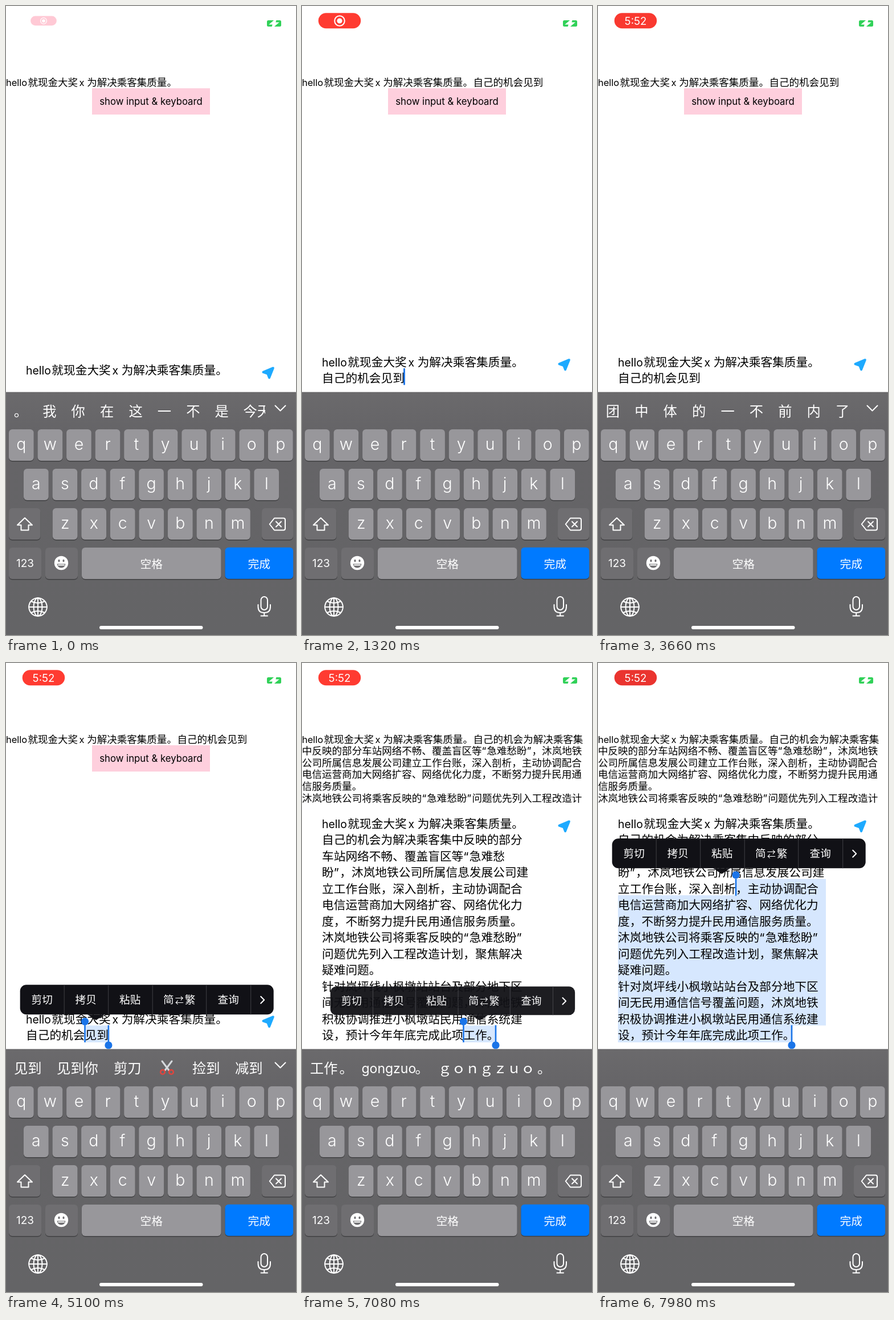
An HTML page that plays this animation: 509x1101 px, repeating every 8000 ms.

```html
<!DOCTYPE html>
<html lang="zh-CN">
<head>
<meta charset="utf-8">
<title>Input and keyboard</title>
<style>
html, body { margin: 0; width: 100%; height: 100%; overflow: hidden; background: #fff; }
svg { display: block; width: 509px; height: 1101px; }
text { font-family: Inter, "Noto Sans CJK SC", "Noto Sans CJK JP", sans-serif; white-space: pre; }
.mid { text-anchor: middle; }
.quote { letter-spacing: .07em; }
.line { fill: none; stroke: #fff; stroke-width: 2; stroke-linecap: round; stroke-linejoin: round; }
</style>
</head>
<body>
<svg viewBox="0 0 509 1101">
  <defs>
    <linearGradient id="board" x2="0" y2="1">
      <stop offset="0" stop-color="#6b6a6c"/>
      <stop offset=".16" stop-color="#656467"/>
      <stop offset="1" stop-color="#646466"/>
    </linearGradient>
    <clipPath id="strip"><rect y="680" width="455" height="56"/></clipPath>
  </defs>
  <rect width="509" height="1101" fill="#fff"/>
  <g id="pill">
    <rect id="pillBox" x="28.700" y="12.300" width="74.500" height="27" rx="13.500"/>
    <g id="rec"><circle class="line" cx="66" cy="26" r="8.8"/><circle cx="66" cy="26" r="4.6" fill="#fff"/></g>
    <text id="clock" class="mid" x="66" y="32.8" font-size="18.6" fill="#fff">5:52</text>
  </g>
  <rect x="458" y="25" width="25" height="11" rx="2.5" fill="#30d158"/>
  <path d="M474 23L464 31.5H469L467 38L477 29.5H472Z" fill="#fff" stroke="#fff" stroke-width="2"/>
  <g id="label"></g>
  <g id="button">
    <rect x="151" y="144" width="207" height="46" fill="#fecfdd"/>
    <text class="mid" x="254.5" y="172.8" font-size="16.75">show input &amp; keyboard</text>
  </g>
  <g id="mark"></g>
  <g id="field"></g>
  <path id="send" d="M468.800 -8.300L451.500 -1L459.300 1.700L462 8.700Z" fill="#1eaaff" stroke="#1eaaff" stroke-width="4" stroke-linejoin="round"/>
  <g id="handles"></g>
  <g id="caret"><rect width="2.8" height="29.500" rx="1" fill="#1a72e6"/></g>
  <g id="menu"></g>
  <g id="keys"></g>
  <g id="cands" clip-path="url(#strip)" fill="#fff"></g>
  <path id="chevron" class="line" d="M472.500 699.500L481.500 708.500L490.500 699.500"/>
  <g id="knob"></g>
</svg>
<script>
const $ = id => document.getElementById(id);
const clamp = v => Math.max(0, Math.min(1, v));
const ramp = (t, a, b) => clamp((t - a) / (b - a));
const easeOut = k => 1 - (1 - k) ** 3;
const mix = (a, b, k) => a + (b - a) * k;
const text = (x, y, size, s, attrs = '') => `<text x="${x}" y="${y}" font-size="${size}" ${attrs}>${s}</text>`;
const prose = (x, y, size, s) => text(x, y, size, s.replace(/[“”]/g, '<tspan class="quote">$&</tspan>'));

const LOOP = 8000, TYPE = 180, COMMIT = 1080, PICK = 4140, PASTE = 5930, PICK2 = 6800;
const DRAG = 7300, DROP = 7640;
const EM = 20.7, LEFT = 35, RIGHT = 400, BLUE = '#1a74e8';
const typed = 'zjdjhjd', phrase = '自己的机会见到';
const body = `自己的机会为解决乘客集中反映的部分
车站网络不畅、覆盖盲区等“急难愁
盼”，沐岚地铁公司所属信息发展公司建
立工作台账，深入剖析，主动协调配合
电信运营商加大网络扩容、网络优化力
度，不断努力提升民用通信服务质量。
沐岚地铁公司将乘客反映的“急难愁盼”
问题优先列入工程改造计划，聚焦解决
疑难问题。
针对岚坪线小枫墩站站台及部分地下区
间无民用通信信号覆盖问题，沐岚地铁
积极协调推进小枫墩站民用通信系统建
设，预计今年年底完成此项工作。`.split('\n');
const summary = `中反映的部分车站网络不畅、覆盖盲区等“急难愁盼”，沐岚地铁
公司所属信息发展公司建立工作台账，深入剖析，主动协调配合
电信运营商加大网络扩容、网络优化力度，不断努力提升民用通
信服务质量。
沐岚地铁公司将乘客反映的“急难愁盼”问题优先列入工程改造计`.split('\n');

// Opening sentence mixes Latin and Chinese runs
function opening(x, y, em) {
  const latin = em * .94;
  return text(x, y, latin, 'hello') + text(x + 2.19 * em, y, em, '就现金大奖') +
    text(x + 7.32 * em, y, latin, 'x') + text(x + 8.1 * em, y, em, '为解决乘客集质量。');
}

const cache = {};
function put(id, html) {
  if (cache[id] !== html) $(id).innerHTML = cache[id] = html;
}
const fade = (id, a) => $(id).setAttribute('opacity', a.toFixed(3));

// Line centres are numbered 0..13 from the top of the expanded field
const lineY = i => 281 + 28.5 * i;

function key(x, y, w, fill, label = '', size = 28.5, dy = 36, attrs = 'font-weight="300"') {
  return `<rect x="${x}" y="${y + 1.5}" width="${w}" height="55" rx="6" fill="#414143"/>` +
    `<rect x="${x}" y="${y}" width="${w}" height="55" rx="6" fill="${fill}"/>` +
    text(x + w / 2, y + dy, size, label, `class="mid" fill="#fff" ${attrs}`);
}

function keyboard(composing) {
  const light = '#98979b', dark = '#6f6e71';
  let s = '<rect y="675.7" width="509" height="426" fill="url(#board)"/>';
  [['qwertyuiop', 5], ['asdfghjkl', 31], ['zxcvbnm', 81.8]].forEach(([row, x], r) => {
    [...row].forEach((c, i) => s += key(+(x + 50.55 * i).toFixed(2), 741 + 69 * r, 43.7, light, c));
  });
  s += key(5, 879, 55.5, dark) + key(449, 879, 55, dark) + key(69, 948, 57, dark);
  s += key(5, 948, 57, dark, '123', 19, 34, '');
  s += key(133, 948, 244.5, light, composing ? '选定' : '空格', 19.8, 36, '');
  s += key(384.5, 947.7, 119.6, '#007aff', composing ? '确认' : '完成', 19.8, 36, '');
  return s + `
    <path class="line" d="M33 896L46 908.500H39.500V917.500H26.500V908.500H20Z"/>
    <path class="line" d="M471 896.500H487Q490 896.500 490 899.500V914.500Q490 917.500 487 917.500H471L462.700 907Z M474 902.500L483 911.500M483 902.500L474 911.500"/>
    <circle cx="97" cy="975" r="12.200" fill="#fff"/>
    <g fill="#6f6e71"><ellipse cx="93" cy="971" rx="1.600" ry="2.300"/><ellipse cx="101" cy="971" rx="1.600" ry="2.300"/>
    <path d="M89.500 976.500H104.500Q103 983.500 97 983.500T89.500 976.500Z"/></g>
    <path class="line" stroke-linecap="butt" d="M92 978.500H102"/>
    <g class="line"><circle cx="56" cy="1052" r="15.800"/><ellipse cx="56" cy="1052" rx="7.500" ry="15.800"/>
    <path d="M56 1036V1068M40 1052H72M44 1042Q56 1048 68 1042M44 1062Q56 1056 68 1062"/>
    <rect x="447.500" y="1034" width="11.500" height="23" rx="5.750"/>
    <path d="M442.500 1048V1051.500Q442.500 1062 453.250 1062T464 1051.500V1048M453.250 1062V1067.500M447.500 1067.500H459"/></g>
    <rect x="164" y="1085" width="181.500" height="6" rx="3" fill="#fff"/>`;
}

const evenly = list => [...list].map((c, i) => [13.8 + 50.4 * i, c]);
const scissors = `<g fill="none" stroke-linecap="round"><path d="M274 697L286 713M291 697L279 713" stroke="#d5d9dd" stroke-width="3"/>
  <g stroke="#e0453e" stroke-width="2.600"><circle cx="275" cy="716" r="3.800"/><circle cx="290" cy="716" r="3.800"/></g></g>`;

function candidates(t, count) {
  if (t < TYPE) return [...evenly('。我你在这一不是'), [416.5, '今天']];
  if (t < COMMIT) {
    let x = 14;
    return [phrase.slice(0, count), '自己的', '自己', '在', '这'].map(w => {
      const item = [x, w];
      x += w.length * 24.3 + 26;
      return item;
    });
  }
  if (t < 1560) return [];
  if (t < PICK) return evenly('团中体的一不前内了');
  if (t < 4740) return [];
  if (t < PASTE) return [[14, '见到'], [89, '见到你'], [189, '剪刀'], [327, '捡到'], [402, '减到']];
  if (t < 6960 || t >= 7340) return [];
  return [[14, '工作'], [65.5, '。'], [104.5, 'gongzuo'], [198.5, '。'], [238.5, 'ｇｏｎｇｚｕｏ'], [413, '。']];
}

function menu(t, x, y, tip, start, end, pressAt = Infinity) {
  if (t < start || t > end + 110) return '';
  const shown = easeOut(ramp(t, start, start + 160)), gone = ramp(t, end, end + 110);
  const scale = (.3 + .7 * shown) * (1 - gone), alpha = shown * clamp(1 - 1.2 * gone);
  let s = `<rect width="445" height="52" rx="11" fill="#111116"/>` +
    `<path d="M${tip - x - 15} 52L${tip - x} 62L${tip - x + 15} 52Z" fill="#111116"/>`;
  if (t > pressAt) s += '<rect x="155" width="77" height="52" fill="#3c3c41"/>';
  s += '<path d="M77.500 0V52M155 0V52M232.500 0V52M327 0V52M405 0V52" stroke="#404045"/>';
  const swap = '简<tspan font-size="15" dx="2">⇄</tspan><tspan dx="2">繁</tspan>';
  [['剪切', 38.5], ['拷贝', 115.5], ['粘贴', 193], [swap, 279.5], ['查询', 365.5]].forEach(([w, cx]) =>
    s += text(cx, 33, 18.6, w, 'class="mid" fill="#fff"'));
  s += '<path class="line" d="M422.500 20.500L428.500 26.500L422.500 32.500"/>';
  return `<g opacity="${alpha}" transform="translate(${tip} ${y + 62}) scale(${scale}) translate(${x - tip} -62)">${s}</g>`;
}

// Current selection as start line, start x, end x; it always ends on line 13
function selection(t) {
  if (t >= PICK && t < PASTE) return [13, LEFT + 5 * EM, LEFT + 7 * EM];
  if (t < PICK2) return null;
  const k = ramp(t, DRAG, DROP), e = k * k * (3 - 2 * k);
  const line = Math.round(mix(13, 4, e));
  const col = Math.min(Math.round(mix(12, 10, e)), body[line - 1].length);
  return [line, LEFT + col * EM, 340];
}

const bar = (x, line) => `<rect x="${x - 1.3}" y="${lineY(line) - 17.5}" width="2.600" height="30" fill="${BLUE}"/>`;
const dot = (x, y) => `<circle cx="${x}" cy="${y}" r="6.600" fill="${BLUE}"/>`;

function drawSelection(t) {
  const sel = selection(t), after = t >= PASTE && t < PASTE + 130;
  let mark = '', handles = '', knob = '';
  if (sel) {
    const [line, x, end] = sel, top = lineY(line) - 17, last = lineY(13) - 17;
    const d = line === 13 ? `M${x} ${top}H${end}V664H${x}Z`
      : `M${x} ${top}H${RIGHT}V${last}H${end}V664H${LEFT}V${top + 28.5}H${x}Z`;
    mark = `<path d="${d}" fill="#d6e7fe"/>`;
    handles = bar(x, line) + bar(end, 13) + dot(x, top - 7);
    knob = dot(end, 669);
  } else if (after) {
    const a = .85 * (1 - ramp(t, PASTE + 10, PASTE + 130));
    const wrap = s => `<g opacity="${a}">${s}</g>`;
    handles = wrap(bar(139, 1) + bar(179, 1) + dot(139, 286));
    knob = wrap(dot(179, 669));
  }
  put('mark', mark);
  put('handles', handles);
  put('knob', knob);
  return sel;
}

function drawText(t, count) {
  const composing = count > 0 && t < COMMIT, long = t >= PASTE;
  const first = long ? 0 : count ? 12 : 12.5;
  const base = i => lineY(i) + 7.8;
  let field = opening(LEFT, base(first), EM), label = opening(0, 139.6, 17.55);
  const spaced = [...typed.slice(0, count)].join(' ');
  if (long) {
    body.forEach((s, i) => field += prose(LEFT, base(i + 1), EM, s));
    label += text(300.5, 139.6, 17.55, '自己的机会为解决乘客集');
    summary.forEach((s, i) => label += prose(0, 160.2 + 20.6 * i, 17.55, s));
  } else if (count) {
    const s = composing ? spaced : phrase, k = composing ? .94 : 1;
    field += text(LEFT, base(13), EM * k, s, 'id="tail"');
    label += text(300.5, 139.6, 17.55 * k, s);
  }
  put('field', field);
  put('label', label);
  $('send').setAttribute('transform', `translate(0 ${lineY(first) + 4.7})`);
  $('button').style.display = long ? 'none' : '';
}

function drawCaret(t, count, sel) {
  const composing = count > 0 && t < COMMIT;
  const phase = (t - (t < PASTE ? COMMIT : PASTE)) % 1000;
  let a = composing ? 1 : phase < 700 ? 1 - ramp(phase, 500, 570) : ramp(phase, 930, 1000);
  if (sel || !count) a = 0;
  const x = t >= PASTE ? 340.5 : composing ? LEFT + $('tail').getComputedTextLength() + 1 : 179.5;
  $('caret').setAttribute('transform', `translate(${x - 1.4} 634)`);
  fade('caret', a);
}

function drawPill(t) {
  const grow = easeOut(ramp(t, 0, 320)), s = mix(.61, 1, grow);
  const dim = (.5 + .5 * Math.cos((t - 1950) / 1000 * Math.PI)) ** 6;
  const blue = mix(95, mix(49, 47, dim), grow);
  $('pillBox').setAttribute('fill', `rgb(${mix(255, 234, dim * grow)},${mix(59, 52, dim)},${blue})`);
  $('pill').setAttribute('transform', `translate(66 26) scale(${s}) translate(-66 -26)`);
  fade('pill', mix(.25, 1, grow));
  const swap = ramp(t, 2400, 2700);
  fade('rec', 1 - swap);
  fade('clock', swap);
}

function render(t) {
  const count = t < TYPE ? 0 : Math.min(typed.length, 1 + Math.floor((t - TYPE) / 110));
  drawPill(t);
  drawText(t, count);
  drawCaret(t, count, drawSelection(t));
  put('menu', menu(t, 24.7, 563.3, 158, 4500, 5900, 5520) +
    menu(t, 40.2, 564, 312, 6980, DRAG) + menu(t, 24.7, 307.3, 217, 7760, LOOP));
  put('keys', keyboard(count > 0 && t < COMMIT));
  const list = candidates(t, count), scissorsOn = t >= 4740 && t < PASTE;
  const size = s => /[a-z]/.test(s) ? 23 : 24.3;
  put('cands', list.map(([x, s]) => text(x, 718, size(s), s)).join('') + (scissorsOn ? scissors : ''));
  fade('chevron', t < COMMIT || (t >= 1560 && t < 4260) || scissorsOn ? 1 : 0);
}

const began = performance.now();
function tick() {
  render((performance.now() - began) % LOOP);
  requestAnimationFrame(tick);
}
tick();
</script>
</body>
</html>
```
